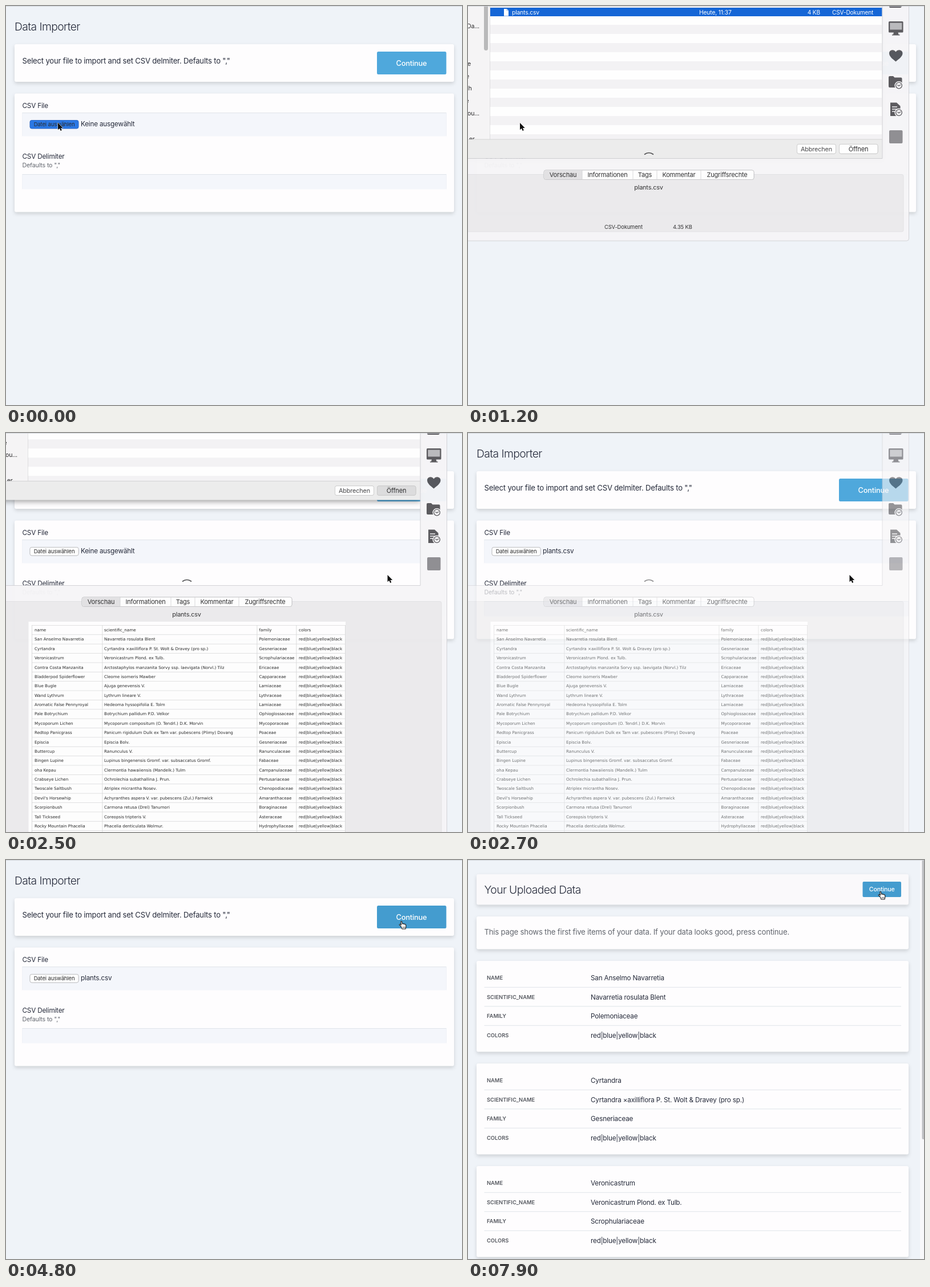
Animation, 799 px wide and 700 px high, one loop 8000 ms. Source, as an HTML page:

```html
<!DOCTYPE html>
<html lang="en">
<head>
<meta charset="utf-8">
<title>Data Importer</title>
<style>
html, body { margin: 0; width: 100%; height: 100%; overflow: hidden; background: #eff3f8; }
#stage { display: block; width: 799px; height: 700px; }
text { font-family: Inter, "Open Sans", sans-serif; letter-spacing: -.015em; fill: #252a3a; white-space: pre; }
.title { font-weight: 300; letter-spacing: -.03em; }
.label { font-weight: 600; letter-spacing: 0; fill: #55585f; }
.soft { fill: #62666e; }
.white { fill: #fff; }
.mid { text-anchor: middle; }
.end { text-anchor: end; }
.bold { font-weight: 500; }
.ui { fill: #2b2b2c; }
.cell { font-family: "DejaVu Sans", sans-serif; letter-spacing: 0; fill: #222; }
.card { filter: drop-shadow(0 3px 3px #00000024); }
.sheetbox { filter: drop-shadow(0 3px 5px #00000060); }
.btn { filter: drop-shadow(0 .5px .5px #00000030); }
</style>
</head>
<body>
<svg id="stage" viewBox="0 0 799 700"></svg>
<script>
const plants = `San Anselmo Navarretia~Navarretia rosulata Blent~Polemoniaceae
Cyrtandra~Cyrtandra ×axilliflora P. St. Wolt &amp; Dravey (pro sp.)~Gesneriaceae
Veronicastrum~Veronicastrum Plond. ex Tulb.~Scrophulariaceae
Contra Costa Manzanita~Arctostaphylos manzanita Sorvy ssp. laevigata (Norvl.) Tilz~Ericaceae
Bladderpod Spiderflower~Cleome isomeris Mawber~Capparaceae
Blue Bugle~Ajuga genevensis V.~Lamiaceae
Wand Lythrum~Lythrum lineare V.~Lythraceae
Aromatic False Pennyroyal~Hedeoma hyssopifolia E. Tolm~Lamiaceae
Pale Botrychium~Botrychium pallidum P.D. Velkor~Ophioglossaceae
Mycoporum Lichen~Mycoporum compositum (O. Tendrl.) D.K. Morvin~Mycoporaceae
Redtop Panicgrass~Panicum rigidulum Dulk ex Tarn var. pubescens (Plimy) Dovang~Poaceae
Episcia~Episcia Bolv.~Gesneriaceae
Buttercup~Ranunculus V.~Ranunculaceae
Bingen Lupine~Lupinus bingenensis Gromf. var. subsaccatus Gromf.~Fabaceae
oha Kepau~Clermontia hawaiiensis (Mandelk.) Tulm~Campanulaceae
Crabseye Lichen~Ochrolechia subathallina J. Prun.~Pertusariaceae
Twoscale Saltbush~Atriplex micrantha Nosev.~Chenopodiaceae
Devil's Horsewhip~Achyranthes aspera V. var. pubescens (Zul.) Farnwick~Amaranthaceae
Scorpionbush~Carmona retusa (Drel) Tanumori~Boraginaceae
Tall Tickseed~Coreopsis tripteris V.~Asteraceae
Rocky Mountain Phacelia~Phacelia denticulata Wolmur.~Hydrophyllaceae`
  .split("\n").map(line => [...line.split("~"), "red|blue|yellow|black"]);
const fields = ["name", "scientific_name", "family", "colors"];

// y is the middle of the capitals
const text = (x, y, size, str, cls = "", attrs = "") =>
  `<text x="${x}" y="${(y + size * .36).toFixed(2)}" font-size="${size}" class="${cls}" ${attrs}>${str}</text>`;
const rect = (x, y, x2, y2, fill, attrs = "") =>
  `<rect x="${x}" y="${y}" width="${x2 - x}" height="${y2 - y}" fill="${fill}" ${attrs}/>`;
const path = (d, attrs = "") => `<path d="${d}" ${attrs}/>`;
const list = (n, make) => Array.from({ length: n }, (_, i) => make(i)).join("");
const card = (x2, y, y2, fill = "#fefdfe") => rect(15, y, x2, y2, fill, 'rx="3" class="card"');
const field = (y, y2) => rect(28.5, y, 771.5, y2, "#f4f6fb", 'rx="2"') + rect(28.5, y, 771.5, y + 1, "#dfe4ea") +
  rect(28.5, y, 29, y2, "#e4e8ee") + rect(771, y, 771.5, y2, "#e4e8ee");
const button = (x, y, x2, y2, id) => rect(x, y, x2, y2, "#fefefe", `id="${id}" rx="3" stroke="#c9c9c9" stroke-width=".8" class="btn"`);

const formPage = `<g id="form">
  ${text(15, 36, 19.3, "Data Importer", "title")}
  ${card(785, 67, 133)}
  ${text(28.5, 96, 13.1, 'Select your file to import and set CSV delmiter. Defaults to ","')}
  ${rect(650, 80, 771.5, 120, "#4fa8dc", 'id="next1" rx="2.5"')}
  ${text(710.5, 100, 12.8, "Continue", "white bold mid")}
  ${card(785, 153.5, 361.5)}
  ${text(28.5, 175, 11.7, "CSV File")}
  ${field(187, 228.5)}
  ${button(42, 200.5, 127, 215, "pick")}
  ${text(84.5, 208, 9.5, "Datei auswählen", "ui mid")}
  ${text(131, 207, 11.7, "", "", 'id="chosen"')}
  ${text(28.5, 264, 11.7, "CSV Delimiter")}
  ${text(28.5, 279.5, 10.7, 'Defaults to ","', "soft")}
  ${field(295, 321.5)}
</g>`;

const record = (row, k) => card(772, 177 + k * 180, 336.5 + k * 180) + row.map((value, i) => {
  const y = 207 + k * 180 + i * 33.5;
  return text(33, y, 9.3, fields[i].toUpperCase(), "label") + text(215, y, 11.7, value) +
    (i < 3 ? rect(28.5, y + 15.8, 759, y + 16.8, "#dfe4e9") : "");
}).join("");

const dataPage = `<g id="data">
  ${rect(792, 0, 799, 700, "#f8f8fa")}
  ${rect(795.5, 0, 801, 490, "#bfc0c3", 'rx="2.5"')}
  ${card(772, 25, 78.5, "#faf9fb")}
  ${text(28.5, 52, 19.3, "Your Uploaded Data", "title")}
  ${rect(691.5, 38, 759, 65, "#4fa8dc", 'id="next2" rx="2"')}
  ${text(725.2, 51.5, 10.7, "Continue", "white bold mid")}
  ${card(772, 99, 156.5)}
  ${text(28.5, 126, 13.15, "This page shows the first five items of your data. If your data looks good, press continue.", "soft")}
  ${plants.slice(0, 3).map(record).join("")}
</g>`;

const sidebar = [["Da...", 20, 35.5], ["e", 5, 101], ["e", 2, 123], ["h", 6.5, 144.5], ["e", 1.5, 166.5], ["ou...", 20, 188], ["er", 11.5, 233]];
const sheet = `<g id="sheet">
  ${rect(-20, -40, 726, 267, "#ececec", 'class="sheetbox"')}
  ${rect(0, -40, 38, 234, "#f5f4f5")}
  ${sidebar.map(([s, x, y]) => text(x, y, 10.6, s, "ui end")).join("")}
  ${rect(28, -10, 35, 78, "#b9b9ba", 'rx="3.5"')}
  ${rect(38, 0, 725.5, 234, "#fefefe")}
  ${list(8, i => rect(38, 1 + i * 32, 725.5, Math.min(17 + i * 32, 234), "#f3f2f4"))}
  ${rect(38, 0, 725.5, 1, "#cfcfd0")}
  ${rect(38, 0, 38.7, 234, "#d6d6d7")}
  <g id="file">
    ${rect(39, 3, 725.5, 18, "#1566d6")}
    ${path("M63 5h5l3 3v9.5h-8z", 'fill="#fff"')}${path("M68 5v3h3", 'fill="none" stroke="#7da9e4" stroke-width=".8"')}
    ${text(77, 11.5, 10.3, "plants.csv", "white")}
    ${text(405, 11.5, 10.3, "Heute, 11:37", "white")}
    ${text(617, 11.5, 10.2, "4 KB", "white end")}
    ${text(638, 11.5, 10.15, "CSV-Dokument", "white")}
  </g>
  ${rect(0, 234, 726, 267, "#ececec")}${rect(0, 233.6, 726, 234.4, "#cccccd")}
  ${button(576.5, 242.5, 644.5, 259, "cancel")}
  ${text(610.5, 251, 10.9, "Abbrechen", "mid", 'id="cancelText"')}
  ${button(650.5, 242.5, 718, 259, "open")}
  ${text(684, 251, 11, "Öffnen", "mid", 'id="openText"')}
</g>`;

const clock = (x, y) => `<circle cx="${x}" cy="${y}" r="6.8" fill="#57565a" stroke="#f6f5f7" stroke-width="1.6"/>
  <circle cx="${x}" cy="${y}" r="4.7" fill="#f6f5f7"/>` + path(`M${x - 2.6} ${y - 1.2}l2.6 2 3-2.3`, 'fill="none" stroke="#57565a" stroke-width="1.3"');
const icons = `<g fill="#57565a">
  ${path("M738 -6h17l6 6-3 3h-18q-2 0-2-2z")}
  ${path("M738.5 27h22.5q1.5 0 1.5 1.5v16.5q0 1.5-1.5 1.5h-22.5q-1.5 0-1.5-1.5v-16.5q0-1.5 1.5-1.5z")}
  ${rect(739.3, 29.5, 760.3, 41.5, "#b9b8bb")}${path("M746 46h7.5l1 4h2v1.5h-13.5v-1.5h2z")}
  ${path("M749.5 97.5C744 93 738 88.5 738 83C738 76.5 746.5 75 749.5 80.5C752.5 75 761.5 76.5 761.5 83C761.5 88.5 755 93 749.5 97.5Z")}
  ${path("M737 125q0-2 2-2h6l2.5 2.5h11q2 0 2 2V141q0 2-2 2h-19.5q-2 0-2-2z")}${clock(755, 139.5)}
  ${path("M740 169.5h11l6.5 6v17.5h-17.5z")}
  ${path("M743 177h9M743 181h9M743 185h6", 'stroke="#f6f5f7" stroke-width="1.3"')}${clock(755, 187)}
  ${rect(738, 218, 761.5, 241, "#8d8c90", 'rx="2"')}
</g>`;

const columns = [50, 172, 443.5, 513], rowH = 16.375;
const table = `<svg id="table" x="0" y="0" width="799" height="700">
  ${rect(39.5, 331, 595, 800, "#fefefe")}
  ${[fields, ...plants].map((row, r) => row.map((s, i) => text(columns[i], 345.5 + r * rowH, 7.15, s, "cell")).join("")).join("")}
  ${list(24, r => rect(45, 337 + r * rowH, 594.5, 337.8 + r * rowH, "#d9d9da"))}
  ${[45, 168.5, 439.5, 508.5, 594].map(x => rect(x, 337, x + .8, 714, "#d3d3d4")).join("")}
</svg>`;

const tabs = [["Vorschau", 166.5], ["Informationen", 244.5], ["Tags", 310], ["Kommentar", 369.5], ["Zugriffsrechte", 454]];
const panel = `<g id="panel">
  <path id="frame" fill="#f6f5f7" stroke="#cfcfd2" stroke-width=".9"/>
  ${icons}
  ${path("M309 260.5Q317 254.5 325 260.5", 'fill="none" stroke="#4b4b4d" stroke-width="1.7"')}
  ${rect(-9, 295.5, 763, 396, "#ebeaec", 'id="well" rx="3" stroke="#dfdee1" stroke-width=".8"')}
  ${rect(133, 288, 501, 304.5, "#fefefe", 'rx="3.5" stroke="#c4c4c7" stroke-width=".9" class="btn"')}
  ${path("M200 288.5h-63.5q-3 0-3 3v9.5q0 3 3 3h63.5z", 'fill="#e2e1e3"')}
  ${[200, 289, 331, 408].map(x => rect(x - .4, 288, x + .4, 304.5, "#cfcfd1")).join("")}
  ${tabs.map(([s, x]) => text(x, 296.3, 11, s, "ui mid")).join("")}
  ${text(316.5, 318, 10.9, "plants.csv", "ui mid")}
  ${table}
  <g id="info">${text(239, 388, 9.4, "CSV-Dokument", "ui")}${text(359, 388, 9.4, "4.35 KB", "ui")}</g>
</g>`;

const pointers = `
  ${path("M0 0V12.2L2.8 9.7L4.7 14L6.8 13.1L4.9 8.9H8.7Z", 'id="arrow" fill="#111" stroke="#fff" stroke-width="1" paint-order="stroke"')}
  <g id="hand">${path("M3.2 9.5L.9 7.6C.2 6.8 1.4 5.7 2.5 6.3L4 7.5 3.2 2.2C3.1 .8 4.9 .5 5.2 1.9L6 5.6C6.3 4.7 7.8 4.8 8 5.9 8.4 5.1 9.8 5.3 10 6.4 10.6 5.8 11.8 6.1 12 7.2L12.4 9.8C12.5 11.5 11.8 12.4 11.6 14.5H5.4C5.2 12.6 4 11.2 3.2 9.5Z", 'fill="#fff" stroke="#1a1a1a" stroke-width="1.1" stroke-linejoin="round"')}
  ${path("M7 10.5v2.5M8.8 10.5v2.5M10.5 10.5v2.5", 'stroke="#1a1a1a" stroke-width=".7"')}</g>`;

const $ = id => document.getElementById(id);
$("stage").innerHTML = rect(0, 0, 799, 700, "#eff3f8") + formPage + dataPage + sheet + panel +
  rect(0, 0, 799, .8, "#cdd1d7") + pointers;

const ease = (t, a, b) => {
  const u = Math.min(1, Math.max(0, (t - a) / (b - a)));
  return u * u * (3 - 2 * u);
};
const mix = (a, b, u) => a + (b - a) * u;
const show = (id, on) => $(id).style.display = on ? "" : "none";
const set = (id, name, value) => $(id).setAttribute(name, value);
const blue = u => `rgb(${mix(79, 68, u)},${mix(168, 156, u)},${mix(220, 207, u)})`;

// [start, end, x, y] of each pointer move
const moves = [[0, 1, 91, 205], [1400, 2100, 668.5, 249], [3500, 4200, 692, 107], [6700, 7400, 722, 55]];
function pointerAt(t) {
  let [x, y] = moves[0].slice(2);
  for (const [a, b, px, py] of moves) {
    const u = ease(t, a, b);
    x = mix(x, px, u);
    y = mix(y, py, u);
  }
  return [x, y];
}

function draw() {
  const t = Math.floor(performance.now() % 8000 / 100) * 100; // ten pictures a second
  const second = t >= 5700, picked = t >= 800, pressed = t >= 2300;
  show("form", !second);
  show("data", second);

  const blueButton = t < 600;
  set("pick", "fill", blueButton ? "#2b78e4" : "#fefefe");
  set("pick", "stroke", blueButton ? "#1f5fc4" : "#b5b5b8");
  $("chosen").textContent = t < 2700 ? "Keine ausgewählt" : "plants.csv";

  const slide = ease(t, 0, 400) - ease(t, 2300, 2670);
  show("sheet", slide > 0);
  set("sheet", "transform", `translate(0 ${(slide - 1) * 267})`);
  show("file", picked);
  $("cancelText").style.fill = picked ? "#4a4a4c" : "#858587";
  $("openText").style.fill = picked ? "#2b2b2c" : "#c3c3c5";
  for (const id of ["cancel", "open"]) set(id, "fill", picked ? "#fefefe" : "#f4f4f4");
  if (pressed) set("open", "fill", "#dcdcdd");

  const fade = ease(t, 600, 900) - ease(t, 2500, 3000);
  const bottom = mix(412, 820, ease(t, 1200, 1700));
  show("panel", fade > 0);
  $("panel").style.opacity = fade * .965;
  set("frame", "d", `M726 -9H772.5V${bottom - 4}q0 4-4 4H-9V267.5H726Z`);
  set("well", "height", bottom - 311.5);
  set("info", "transform", `translate(0 ${bottom - 412})`);
  show("table", t >= 1300);
  set("table", "height", bottom - 40);

  const [x, y] = pointerAt(t);
  const hand = second ? t < 6800 || y < 65 : t >= 3600 && y < 120;
  show("arrow", !hand);
  show("hand", hand);
  set("arrow", "transform", `translate(${x} ${y})`);
  set("hand", "transform", `translate(${x - 3.5} ${y - .5})`);
  set("next1", "fill", blue(ease(t, 3800, 4200)));
  set("next2", "fill", blue(ease(t, 7100, 7600)));
  requestAnimationFrame(draw);
}
draw();
</script>
</body>
</html>
```
